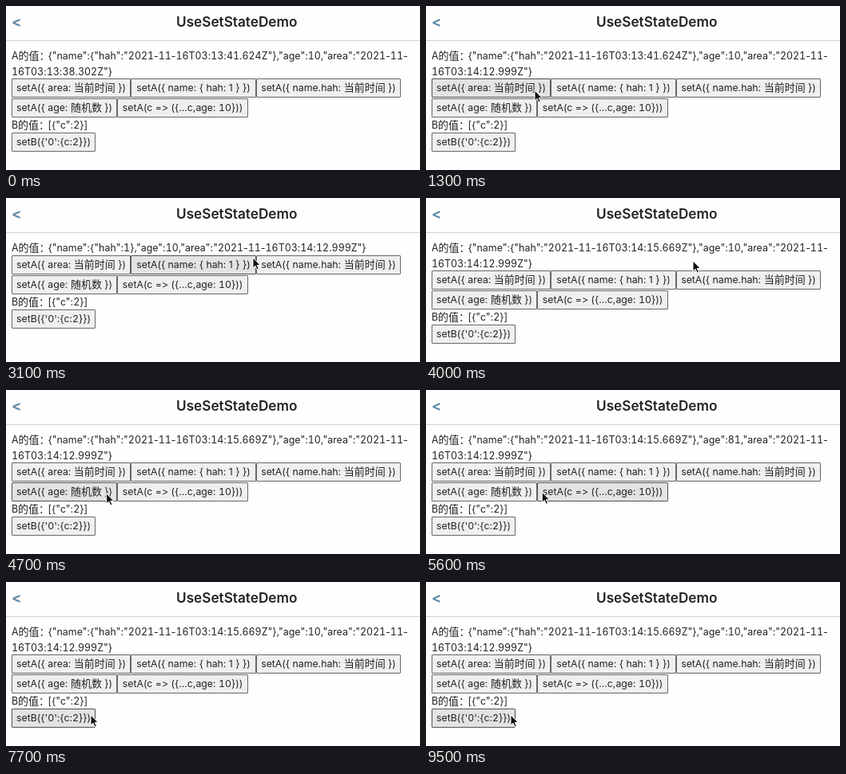
Recreate the animation shown at these times as an HTML page. Size 518 by 206 pixels, loop 10 s.

```html
<!DOCTYPE html>
<html lang="zh">
<head>
<meta charset="utf-8">
<title>UseSetStateDemo</title>
<style>
  html, body { margin: 0; width: 100%; height: 100%; overflow: hidden; background: #fefefe; }
  body {
    position: relative; color: #222; white-space: pre;
    font: 12.4px/19.5px Inter, "Noto Sans CJK SC", "Noto Sans CJK", sans-serif;
    font-feature-settings: "calt" 0;
  }
  header, .label, .value, .row, #lower, #cursor { position: absolute; left: 0; }
  header { top: 0; width: 100%; height: 43px; border-bottom: 1px solid #cfd4d8; }
  header b { position: absolute; top: 0; line-height: 40px; }
  #back { left: 7px; font-size: 18px; color: #5f8aa8; }
  #title { left: 213px; font-size: 17.2px; font-weight: 600; }
  i { font-style: normal; font-size: 13px; line-height: 0; }
  u { text-decoration: none; font-feature-settings: "calt" 0, "tnum"; }
  .label, .value, .row { left: 7px; }
  .value { text-indent: 45.5px; }
  .row { display: flex; font-size: 12.3px; }
  .btn {
    box-sizing: border-box; height: 24px; line-height: 22px; text-align: center;
    border: 1px solid #686868; border-radius: 1px; background: #efefef;
  }
  .hover { background: #e3e3e3; border-color: #505050; }
  .press { background: #f4f4f4; border-color: #808080; }
  #lower, #cursor { top: 0; }
  #cursor { overflow: visible; }
</style>
</head>
<body>
<header><b id="back">&lt;</b><b id="title">UseSetStateDemo</b></header>
<div class="label" style="top:53px">A<i>的值：</i></div>
<div class="value" id="a" style="top:53px"></div>
<div id="lower"><div class="row" style="top:91px"
  ><div class="btn" style="width:149px">setA({ area: <i>当前时间</i> })</div
  ><div class="btn" style="width:157px">setA({ name: { hah: 1 } })</div
  ><div class="btn" style="width:181px">setA({ name.hah: <i>当前时间</i> })</div
></div><div class="row" style="top:116px"
  ><div class="btn" style="width:132px">setA({ age: <i>随机数</i> })</div
  ><div class="btn" style="width:164px">setA(c =&gt; ({...c,age: <u>10</u>}))</div
></div><div class="label" style="top:140px">B<i>的值：</i></div
><div class="value" style="top:140px">[{"c":<u>2</u>}]</div
><div class="row" style="top:159px"><div class="btn" style="width:105px">setB({'<u>0</u>':{c:<u>2</u>}})</div></div></div>
<svg id="cursor" width="10" height="16">
  <path d="M0 0V13L3 10.3L5.1 15L7.3 14L5.2 9.5H9.2Z" fill="#111" stroke="#fff"/>
</svg>
<script>
const $ = id => document.getElementById(id);
const buttons = [...document.querySelectorAll('.btn')];
const LOOP = 10000, STEP = 100, ENTER = 500;

// when each click takes effect
const click = { area: 1200, name: 2500, hah: 4000, random: 5200, ten: 6600, b: 9500 };

// pointer moves: start, end, x, y
const moves = [
  [ENTER, 1200, 136, 106],
  [1700, 2200, 235, 107],
  [2700, 3100, 309, 75],
  [3100, 3500, 334, 79],
  [4100, 4800, 125, 130],
  [5500, 6100, 173, 126],
  [6900, 7700, 106, 167],
];
const easeOut = k => 1 - (1 - k) ** 3;

function pointer(t) {
  let x = 168, y = 173;
  for (const [from, to, toX, toY] of moves) {
    if (t < from) break;
    const k = easeOut(Math.min(1, (t - from) / (to - from)));
    x += (toX - x) * k;
    y += (toY - y) * k;
  }
  return { x, y };
}

function stateA(t) {
  const hah = t >= click.hah ? '"2021-11-16T03:14:15.669Z"'
    : t >= click.name ? 1 : '"2021-11-16T03:13:41.624Z"';
  const age = t >= click.random && t < click.ten ? 81 : 10;
  const area = t >= click.area ? '03:14:12.999Z' : '03:13:38.302Z';
  const wrap = hah === 1 ? '' : '\n';
  return `{"name":{"hah":${hah}},"age":${age},"area":"2021-11-${wrap}16T${area}"}`;
}

function draw(now) {
  const t = Math.floor(now % LOOP / STEP) * STEP;
  const text = stateA(t);
  $('a').innerHTML = text.replace(/\d+/g, '<u>$&</u>');
  $('lower').style.transform = `translateY(${text.includes('\n') ? 0 : -19}px)`;

  const shown = t >= ENTER;
  const { x, y } = pointer(t);
  const pressed = Object.values(click).some(at => t < at && t >= at - 2 * STEP);
  for (const el of buttons) {
    const r = el.getBoundingClientRect();
    const over = shown && x >= r.left && x < r.right && y >= r.top && y < r.bottom;
    el.className = 'btn' + (over ? pressed ? ' press' : ' hover' : '');
  }
  $('cursor').style.display = shown ? 'block' : 'none';
  $('cursor').style.transform = `translate(${x}px, ${y}px)`;
}

const start = performance.now();
function tick() {
  draw(performance.now() - start);
  requestAnimationFrame(tick);
}
tick();
</script>
</body>
</html>
```
